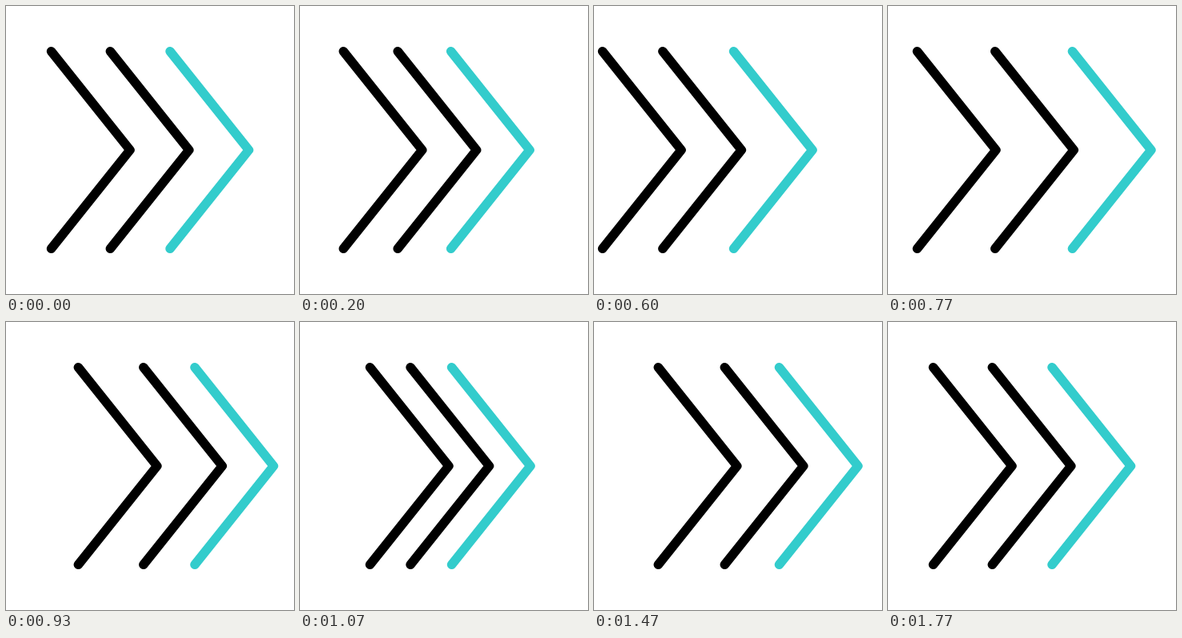
Write an HTML page that moves like this. It is 360 by 360 pixels and loops after 2 s.

```html
<!DOCTYPE html>
<html lang="en">
<head>
<meta charset="utf-8">
<title>Swaying arrows</title>
<style>
  html, body { margin: 0; width: 100%; height: 100%; overflow: hidden; background: #fff; }
  svg { display: block; width: 100%; height: 100%; }
  path { fill: none; stroke: #000; stroke-width: 11.5; stroke-linecap: round; stroke-linejoin: round; }
  .accent { stroke: #33cccc; }
</style>
</head>
<body>
<svg viewBox="0 0 360 360">
  <path d="M56.5 56.7L155 180L56.5 303.3"/>
  <path d="M130.3 56.7L228.8 180L130.3 303.3"/>
  <path class="accent" d="M205 56.7L303.5 180L205 303.3"/>
</svg>
<script>
  const LOOP = 2000, FPS = 30;
  const arrows = [...document.querySelectorAll('path')];
  const delays = [4, 2, 0]; // in ticks; the right arrow leads
  const keys = [[0, 0], [15, -46.5], [26, 41.5], [34, -26], [42, 33], [49, 0]]; // [tick, x offset]

  const smooth = u => u * u * (3 - 2 * u);

  function sway(tick) {
    if (tick <= 0) return 0;
    const next = keys.findIndex(([end]) => tick < end);
    if (next < 0) return 0;
    const [t0, x0] = keys[next - 1], [t1, x1] = keys[next];
    return x0 + (x1 - x0) * smooth((tick - t0) / (t1 - t0));
  }

  function render(ms) {
    // Ticks land on times rounded to 10 ms.
    const tick = Math.floor((ms % LOOP + 5) * FPS / 1000);
    arrows.forEach((arrow, i) =>
      arrow.setAttribute('transform', `translate(${sway(tick - delays[i]).toFixed(2)} 0)`));
  }

  let start;
  function loop(now) {
    start ??= now;
    render(now - start);
    requestAnimationFrame(loop);
  }
  render(0);
  requestAnimationFrame(loop);
</script>
</body>
</html>
```
